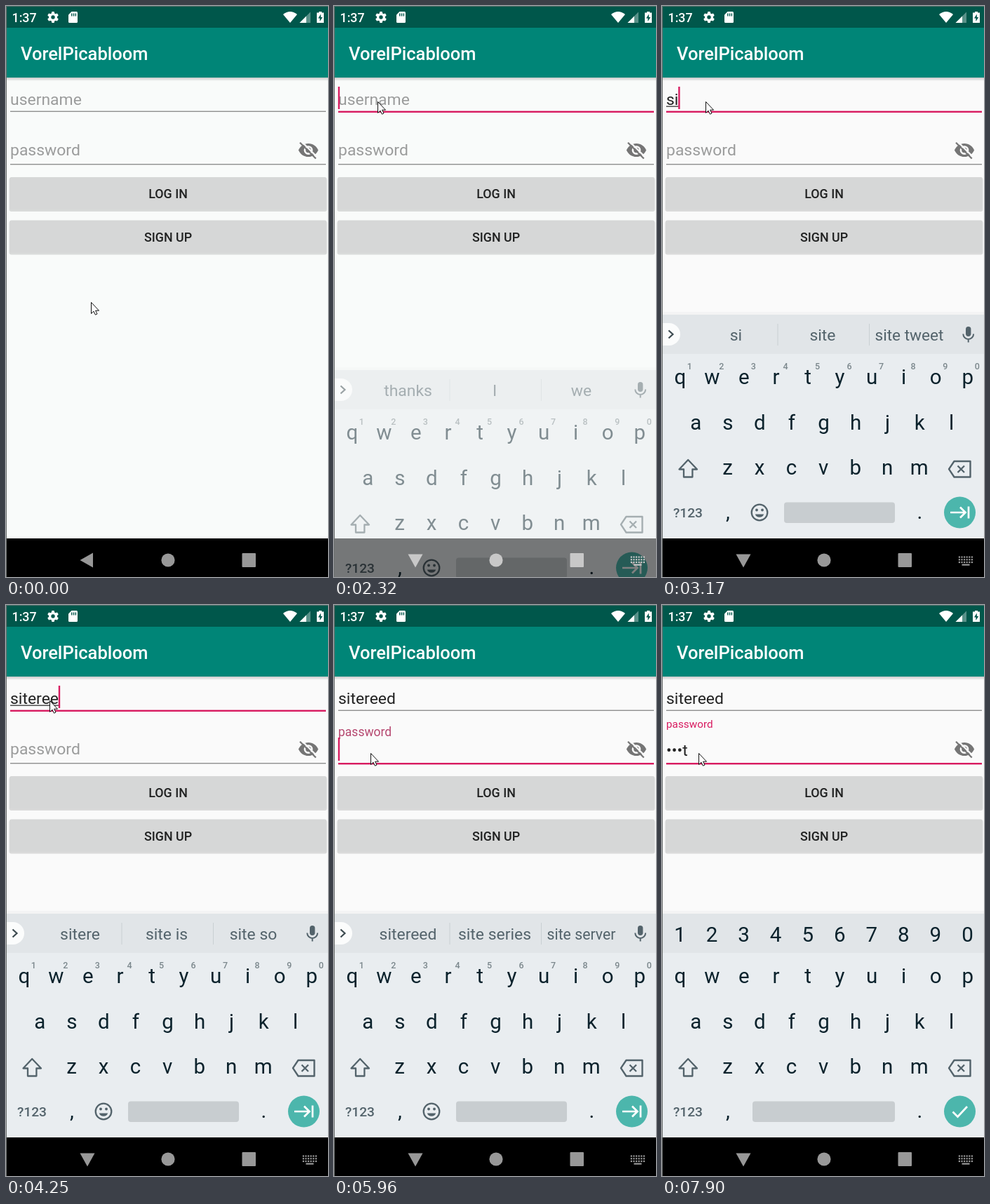
Animation, 459 px wide and 814 px high, one loop 8 s. Source, as an HTML page:

```html
<!DOCTYPE html>
<html lang="en">
<head>
<meta charset="utf-8">
<title>Login form</title>
<style>
html, body { margin: 0; width: 100%; height: 100%; overflow: hidden; background: #f9fbfa; }
svg { display: block; width: 100vw; height: 100vh; }
text { font-family: Roboto, "Noto Sans", sans-serif; white-space: pre; }
.mid { text-anchor: middle; }
.med { font-weight: 500; }
</style>
</head>
<body>
<svg id="stage" viewBox="0 0 459 814"></svg>
<script>
const LOOP = 8000;
const FIELD = 22.95, KEY = 29.5;
const PINK = '#d81b60', INK = '#0b222c', SOFT = '#53636b', HINT = '#9b9c9c';

const text = (x, y, size, fill, str, cls = '', id = '') =>
  `<text x="${x}" y="${y}" font-size="${size}" fill="${fill}" class="${cls}" id="${id}">${str}</text>`;
const rect = (x, y, w, h, fill, more = '') =>
  `<rect x="${x}" y="${y}" width="${w}" height="${h}" fill="${fill}" ${more}/>`;
const path = (d, fill, more = '') => `<path d="${d}" fill="${fill}" ${more}/>`;
const line = (d, color, width, more = '') =>
  path(d, 'none', `stroke="${color}" stroke-width="${width}" ${more}`);
const dot = (x, y, r, fill, more = '') => `<circle cx="${x}" cy="${y}" r="${r}" fill="${fill}" ${more}/>`;
const row = (chars, x0, y, size = KEY, fill = INK, cls = 'mid') =>
  [...chars].map((c, i) => text(x0 + i * 45.55, y, size, fill, c, cls)).join('');

function statusBar() {
  const teeth = [0, 60, 120].map(a =>
    rect(-2, -8, 4, 16, '#fff', `rx="1" transform="rotate(${a})"`)).join('');
  return rect(0, 0, 459, 31, '#00574b') +
    text(8.5, 22.5, 17.85, '#fff', '1:37', 'med') +
    `<g transform="translate(67 16)">${teeth}${dot(0, 0, 6, '#fff')}${dot(0, 0, 2.7, '#00574b')}</g>` +
    path('M93.5 8H100.5Q102 8 102 9.5V22.5Q102 24 100.5 24H90.5Q89 24 89 22.5V12.5Z', '#fff') +
    line('M93.8 10.5v4M96.6 10.5v4M99.4 10.5v4', '#00574b', 1.4) +
    path('M395 12Q405 4 415 12L405 24Z', '#fff') +
    path('M434 8.5V24H418.5Z', '#fff', 'opacity=".35"') +
    path('M428 14.5V24H418.5Z', '#fff') +
    path('M446 8h4v1.6h3V24h-10V9.6h3Z', '#fff') +
    path('M448.8 11.5L445 17.5h2.4v4.5L451.2 16h-2.4Z', '#00574b');
}

function button(y, h, label) {
  return rect(4.5, y + 1, 453, h + 1.5, '#000', 'rx="3" opacity=".13"') +
    rect(5, y, 452, h, '#d6d7d7', 'rx="2.5"') +
    text(231, y + 30.3, 17.85, '#202121', label, 'mid med');
}

function eye() {
  return `<g transform="translate(415.7 190.2) scale(1.275)">` +
    path('M1 12C2.7 7.6 7 4.5 12 4.5S21.3 7.6 23 12C21.3 16.4 17 19.5 12 19.5S2.7 16.4 1 12Z', '#757575') +
    dot(12, 12, 5, '#fafafa') + dot(12, 12, 3, '#757575') +
    line('M3.6 1.6L22.4 20.4', '#fafafa', 1.9) +
    line('M2.6 3.6L20.4 21.4', '#757575', 1.8) + '</g>';
}

function form() {
  return rect(0, 31, 459, 71, '#008577') +
    rect(0, 102, 459, 5, 'url(#shade)') +
    text(21, 77, 25.5, '#fff', 'VorelPicabloom', 'med') +
    text(6, 140.5, FIELD, HINT, 'username', '', 'nameHint') +
    text(6, 140.5, FIELD, '#222', '', '', 'name') +
    rect(6, 142.5, 0, 1.3, '#333', 'id="under"') +
    rect(6, 149.6, 450, 1.4, '#8e8f8f', 'id="nameLine"') +
    text(6, 213, FIELD, HINT, 'password', '', 'passHint') +
    text(6, 214.5, FIELD, '#222', '', '', 'pass') +
    rect(6, 225, 450, 1.4, '#8e8f8f', 'id="passLine"') +
    eye() +
    rect(6, 115, 2.4, 32, PINK, 'id="nameCaret"') +
    rect(6, 189, 2.4, 33, PINK, 'id="passCaret"') +
    button(244, 46.5, 'LOG IN') + button(305.5, 46.5, 'SIGN UP');
}

function keyboard() {
  const strip = path('M1 452H10a16 16 0 0 1 0 32H1Z', '#fbfcfc') +
    line('M9.5 462.5L15.5 468L9.5 473.5', '#3c4a50', 2.2) +
    line('M165 453v31M295.5 453v31', '#c9cfd2', 1) +
    [105.5, 229, 352.5].map((x, i) => text(x, 477, FIELD, SOFT, '', 'mid', 'word' + i)).join('') +
    rect(433, 457, 7.4, 14, SOFT, 'rx="3.7"') +
    line('M429.3 467.5a7.4 7.4 0 0 0 14.8 0M436.7 475v4.5', SOFT, 2);
  const smile = dot(139, 722, 11.3, 'none', `stroke="${SOFT}" stroke-width="2.3"`) +
    dot(135, 718.5, 1.9, SOFT) + dot(143, 718.5, 1.9, SOFT) +
    path('M132.8 724.5h12.4a6.6 6.6 0 0 1-12.4 0Z', SOFT);
  return rect(0, 436, 459, 4, '#000', 'opacity=".025"') +
    rect(0, 440, 459, 319, '#e9edf0') + rect(0, 440, 459, 56, '#e1e5e8') +
    `<g id="strip">${strip}${row('1234567890', 39.3, 517.5, 12.5, '#7b878c', 'mid med')}</g>` +
    `<g id="digits">${row('1234567890', 25.5, 480)}</g>` +
    row('qwertyuiop', 25.8, 538.5) + row('asdfghjkl', 48.3, 603.5) + row('zxcvbnm', 93.5, 668) +
    line('M37.2 647L24.5 660.5H31V671.5H43.4V660.5H50Z', SOFT, 2.3, 'stroke-linejoin="round"') +
    line('M416.5 649H439.5V671.5H416.5L409 660.2Z', SOFT, 2.4, 'stroke-linejoin="round"') +
    line('M421.5 655.5l9.5 9.5m0-9.5l-9.5 9.5', SOFT, 2.3) +
    text(37, 729, 19.2, SOFT, '?123', 'mid med') +
    text(94, 730.5, KEY, INK, ',', 'mid') + text(367.5, 730.5, KEY, INK, '.', 'mid') +
    `<g id="smile">${smile}</g>` +
    rect(174, 707.5, 158, 29.5, '#c8cdd0', 'rx="4" id="space"') +
    dot(424.5, 722, 22.5, '#4cb6ac') +
    line('', '#fff', 2.7, 'id="action"');
}

function navBar() {
  const dots = [784.5, 788.2, 791.9].map(y => [0, 1, 2, 3, 4, 5].map(i =>
    rect(422.8 + i * 3.6, y, 2.2, 2.2, 'inherit')).join('')).join('').replaceAll('fill="inherit"', '');
  return `<path id="back"/><circle cx="231" cy="790" r="9.6"/>` +
    `<rect x="336.5" y="780" width="19.5" height="20" rx="1"/>` +
    `<g id="keysIcon">${dots}<rect x="427.5" y="795.5" width="11" height="2.2"/></g>`;
}

const $ = id => document.getElementById(id);
$('stage').innerHTML =
  `<defs><linearGradient id="shade" x2="0" y2="1"><stop stop-opacity=".2"/><stop offset="1" stop-opacity="0"/></linearGradient></defs>` +
  rect(0, 0, 459, 814, '#f9fbfa', 'id="page"') + form() + statusBar() +
  rect(0, 759, 459, 55, '#000') +
  `<g id="board">${keyboard()}</g><g id="nav">${navBar()}</g>` +
  rect(0, 0, 1, 814, '#6b6f6e') + rect(0, 0, 459, 1, '#4d6c67') +
  path('M.5 .5V16.5L4 13.2L6.4 18.2L9 17L6.6 12.2H11.5Z', '#fff', 'stroke="#111" id="mouse"');

// Each track lists [start, value...]; the latest started entry holds.
const mouseTrack = [[0, 121, 422], [990, 119, 400], [1110, 111, 332], [1230, 100, 266],
  [1380, 80, 190], [1530, 70, 160], [1650, 64, 143], [1770, 62, 136],
  [4930, 59, 169], [5080, 56, 188], [5230, 53, 208], [5380, 52, 211]];
const nameTrack = [3050, 3170, 3420, 3570, 3820, 3970, 4250, 4370]
  .map((t, i) => [t, 'sitereed'.slice(0, i + 1)]);
const passTrack = [6850, 6970, 7250, 7370].map((t, i) => [t, '•'.repeat(i) + 'test'[i]]);
const wordTrack = [[0, 'thanks', 'I', 'we'], [2900, 's', 'so', 'should'],
  [3170, 'si', 'site', 'site tweet'], [3570, 'site', 'sites', 'site page'],
  [3820, 'siter', 'site under', 'site page'], [3970, 'sitere', 'site is', 'site so'],
  [4370, 'sitereed', 'site series', 'site server']];
const nameBlink = [[2200, 1], [2590, 0], [3050, 1], [4930, 0], [5380, 1], [5960, 0]];
const passBlink = [[5960, 1], [6420, 0], [6850, 1], [7900, 0]];
const slideTrack = [[0, 0, 0], [2200, 140, .2], [2320, 79, .5], [2470, 12, .93], [2590, 0, 1]];
const hintTrack = [[0, 213, FIELD, HINT], [5960, 186.5, 17.5, '#b5476f'], [6110, 175, 15.3, PINK]];

const at = (track, t) => {
  const hit = track.findLast(e => e[0] <= t);
  return hit ? hit.slice(1) : [''];
};
const set = (id, attrs) => { for (const k in attrs) $(id).setAttribute(k, attrs[k]); };
const show = (id, on) => set(id, { visibility: on ? 'visible' : 'hidden' });
const write = (id, str) => { if ($(id).textContent !== str) $(id).textContent = str; };
const width = id => $(id).textContent ? $(id).getComputedTextLength() : 0;

function focusLine(id, y, on) {
  set(id, on ? { y, height: 2.4, fill: PINK } : { y, height: 1.4, fill: '#8e8f8f' });
}

function words(t) {
  at(wordTrack, t).forEach((w, i) => {
    const id = 'word' + i, room = i === 2 ? 98 : 108;
    write(id, w);
    set(id, { 'font-size': FIELD });
    const wide = width(id);
    if (wide > room) set(id, { 'font-size': FIELD * room / wide });
  });
}

function draw(t) {
  const [mx, my] = at(mouseTrack, t);
  set('mouse', { transform: `translate(${mx} ${my})` });
  set('page', { fill: t < 2470 ? '#f9fbfa' : '#fafafa' });

  const [name] = at(nameTrack, t), [pass] = at(passTrack, t);
  write('name', name);
  write('pass', pass);
  show('nameHint', !name);
  set('under', { width: t < 5960 ? width('name') : 0 });
  set('nameCaret', { x: 5.8 + width('name') });
  set('passCaret', { x: 5.8 + width('pass') });
  show('nameCaret', at(nameBlink, t)[0]);
  show('passCaret', at(passBlink, t)[0]);
  focusLine('nameLine', 149.6, t >= 2050 && t < 5960);
  focusLine('passLine', 225, t >= 5810);
  const [hy, size, fill] = at(hintTrack, t);
  set('passHint', { y: hy, 'font-size': size, fill });

  const [drop, alpha] = at(slideTrack, t);
  const open = alpha > 0, secret = t >= 6110;
  show('board', open);
  set('board', { transform: `translate(0 ${drop})`, opacity: alpha });
  words(t);
  set('strip', { display: secret ? 'none' : 'inline' });
  set('smile', { display: secret ? 'none' : 'inline' });
  set('digits', { display: secret ? 'inline' : 'none' });
  set('space', secret ? { x: 129, width: 203 } : { x: 174, width: 158 });
  set('action', { d: secret ? 'M414.5 722.5l7 7L435 715' : 'M411 722h21M425 714.5l7.5 7.5l-7.5 7.5M437 713.5v17' });

  set('nav', { fill: open && alpha < 1 ? '#c8c8c8' : '#989898' });
  set('back', { d: open ? 'M105.5 781.5H126.5L116 800.5Z' : 'M105.5 790L124 779.5V800.5Z' });
  set('keysIcon', { display: open ? 'inline' : 'none' });
}

function tick() {
  draw(performance.now() % LOOP);
  requestAnimationFrame(tick);
}
tick();
</script>
</body>
</html>
```
